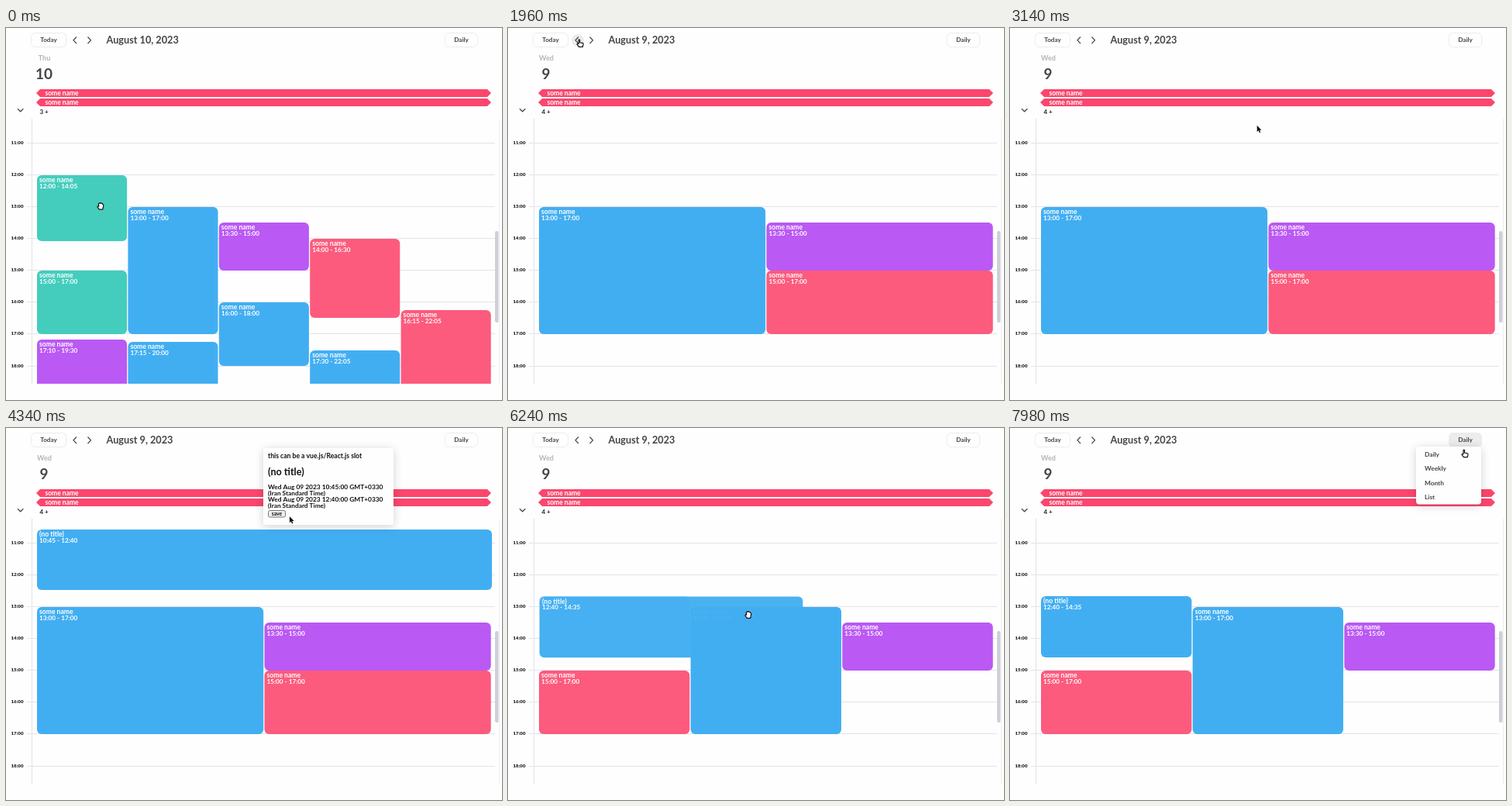
An HTML page with a canvas that plays this animation: 640 by 480 pixels, repeating every 8000 ms.

```html
<!DOCTYPE html>
<html lang="en">
<head>
<meta charset="utf-8">
<title>Day calendar</title>
<style>
html, body { margin: 0; width: 100%; height: 100%; overflow: hidden; background: #fff; }
canvas { display: block; width: 640px; height: 480px; }
</style>
</head>
<body>
<canvas id="stage" width="640" height="480"></canvas>
<script>
const ctx = document.getElementById('stage').getContext('2d');
const LOOP = 8000, LEFT = 40, GRID_WIDTH = 587, HOUR = 41.08;
const BG = '#fefefe', INK = '#45454a', LINE = '#e3e3ea', BORDER = '#ececec', HOVER = '#ececec';
const GREEN = '#44cdbd', BLUE = '#42aef2', PURPLE = '#ba59f3', RED = '#fc5b7d', ALL_DAY = '#fc466d';

// Moments of the story, in ms
const HOVER_PREV = 1420, PREV_DAY = 1960, CREATE = 3340, RELEASE = 3840,
      SAVE = 4600, GRAB = 5180, DROP = 6120, SETTLED = 6340, OPEN_MENU = 7500;

// Events: column, start, end (hours), colour, optional title
const THURSDAY = [
  [0, 12, 14 + 5 / 60, GREEN], [0, 15, 17, GREEN], [0, 17 + 10 / 60, 19.5, PURPLE],
  [1, 13, 17, BLUE], [1, 17.25, 20, BLUE], [2, 13.5, 15, PURPLE], [2, 16, 18, BLUE],
  [3, 14, 16.5, RED], [3, 17.5, 22 + 5 / 60, BLUE], [4, 16.25, 22 + 5 / 60, RED]
];
const WEDNESDAY = [[0, 13, 17, BLUE], [1, 13.5, 15, PURPLE], [1, 15, 17, RED]];
const REARRANGED = [[0, 15, 17, RED], [1, 13, 17, BLUE], [2, 13.5, 15, PURPLE]];
const START = 10.75, LENGTH = 115 / 60, DROPPED = 12 + 40 / 60;

// Cursor: time, x, y, shape from that time on
const CURSOR = [
  [0, 122, 230, 'grab'], [380, 114, 188, 'arrow'], [1320, 80.5, 16, 'arrow'],
  [HOVER_PREV, 88, 19, 'point'], [2160, 95, 20, 'point'], [2300, 96, 21, 'point'],
  [2420, 110, 30, 'arrow'], [3180, 330, 131, 'arrow'], [CREATE, 330, 131, 'arrow'],
  [RELEASE, 330, 209, 'arrow'], [4340, 366, 114, 'arrow'], [4460, 352, 112, 'point'],
  [4660, 350, 113, 'arrow'], [4860, 328, 138, 'grab'], [5100, 306, 162, 'grab'],
  [GRAB, 306, 162, 'arrow'], [5420, 314, 181, 'arrow'], [DROP, 310, 241, 'grab'],
  [6480, 310, 241, 'grab'], [6620, 334, 222, 'arrow'], [7320, 576, 24, 'point'],
  [OPEN_MENU, 587, 20, 'point'], [7960, 587, 33, 'point'], [LOOP, 587, 33, 'point']
];

const yOf = hour => 148.5 + (hour - 11) * HOUR;
const clamp = v => Math.max(0, Math.min(1, v));
const mix = (a, b, k) => a + (b - a) * k;
const smooth = k => k * k * (3 - 2 * k);

function clock(hour) {
  const minutes = Math.round(hour * 60);
  return Math.floor(minutes / 60) + ':' + String(minutes % 60).padStart(2, '0');
}

function text(str, x, y, size, color = INK, align = 'left', weight = 700) {
  ctx.font = `${weight} ${size}px Lato, sans-serif`;
  ctx.textAlign = align;
  ctx.fillStyle = color;
  ctx.fillText(str, x, y);
}

function box(x, y, w, h, r, fill, stroke) {
  ctx.beginPath();
  ctx.roundRect(x, y, w, h, r);
  if (fill) { ctx.fillStyle = fill; ctx.fill(); }
  if (stroke) { ctx.strokeStyle = stroke; ctx.lineWidth = 1; ctx.stroke(); }
}

function path(points, color, width = 1.2) {
  ctx.beginPath();
  for (const [x, y] of points) ctx.lineTo(x, y);
  ctx.strokeStyle = color;
  ctx.lineWidth = width;
  ctx.stroke();
}

function panel(x, y, w, h, r) {
  ctx.save();
  ctx.shadowColor = 'rgba(0,0,0,.18)';
  ctx.shadowBlur = 12;
  ctx.shadowOffsetY = 2;
  box(x, y, w, h, r, BG);
  ctx.restore();
}

function card(x, y, w, h, color, title, time, alpha = 1) {
  ctx.save();
  ctx.globalAlpha = alpha;
  box(x, y, w, h, Math.min(6, h / 2), color);
  ctx.clip();
  text(title, x + 3, y + 9, 8.6, '#fff');
  text(time, x + 3, y + 16.9, 8.2, '#fff');
  ctx.restore();
}

function event([column, start, end, color, title = 'some name'], columns, alpha) {
  const step = GRID_WIDTH / columns;
  const top = Math.round(yOf(start)), bottom = Math.round(yOf(end));
  card(LEFT + column * step, top, step - 1.3, bottom - top, color, title,
    `${clock(start)} - ${clock(end)}`, alpha);
}

function header(t) {
  const thursday = t < PREV_DAY;
  const todayHover = t > 1180 && t < HOVER_PREV;
  box(32.5, 6.5, 45, 18, 5, todayHover ? '#f4f4f4' : null, BORDER);
  text('Today', 55, 18, 8.1, INK, 'center');
  if (t > HOVER_PREV && t < 2400) box(82, 8, 16, 16, 8, HOVER);
  path([[91, 11.5], [87, 15.8], [91, 20]], INK);
  path([[105.5, 11.5], [109.5, 15.8], [105.5, 20]], INK);
  text(`August ${thursday ? 10 : 9}, 2023`, 129.5, 19.6, 12.7);
  box(566.5, 6.5, 42, 18, 5, t > 7260 ? HOVER : null, BORDER);
  text('Daily', 587.5, 18, 8.2, INK, 'center');

  text(thursday ? 'Thu' : 'Wed', 49.5, 42, 9, '#b4b4b8', 'center');
  text(thursday ? '10' : '9', 49, 65.8, 19, INK, 'center');
  for (const y of [79, 91]) {
    ctx.beginPath();
    for (const [x, dy] of [[39, 5], [44, 0], [621, 0], [626, 5], [621, 10], [44, 10]]) ctx.lineTo(x, y + dy);
    ctx.fillStyle = ALL_DAY;
    ctx.fill();
    text('some name', 50.5, y + 7.8, 8.5, '#fff');
  }
  text(thursday ? '3 +' : '4 +', 43.5, 111, 8, '#222');
  path([[15, 104.3], [18.7, 107.8], [22.4, 104.3]], INK);
}

function grid() {
  for (let hour = 11; hour <= 18; hour++) {
    const y = Math.floor(yOf(hour)) + .5;
    path([[27, y], [631, y]], LINE, 1);
    text(hour + ':00', 22.5, y + 1.8, 6.2, '#222', 'right', 900);
  }
  path([[33.5, 117], [33.5, 459]], LINE, 1);
  path([[636.5, 117], [636.5, 459]], '#efeff2', 1);
  box(631, 262, 4.5, 118, 2, '#cfcfd6');
}

function drag(t, cursor) {
  const dy = cursor.y - 162;
  const start = START + Math.floor(dy / HOUR * 12 + .05) / 12;
  event([0, START, START + LENGTH, BLUE, '(no title)'], 1, .38);
  const row = Math.floor((cursor.y - 148.5) / HOUR * 2) / 2 + 11;
  box(34, yOf(row), 597, HOUR / 2, 0, null, BLUE);
  card(LEFT + cursor.x - 306, yOf(START) + dy, GRID_WIDTH + 6, LENGTH * HOUR, BLUE, '(no title)',
    `${clock(start)} - ${clock(start + LENGTH)}`, .96);
}

// The dropped event shrinks from full width into its new column
function settle(t) {
  const y = yOf(DROPPED), h = LENGTH * HOUR;
  const width = mix(586, 194.5, smooth(clamp((t - DROP) / (SETTLED - DROP - 14))));
  event([0, DROPPED, DROPPED + LENGTH, BLUE, '(no title)'], 3, .4);
  card(41, y + .6, width, h, BLUE, '(no title)', '12:40 - 14:35', .95);
}

function events(t, cursor) {
  ctx.save();
  ctx.beginPath();
  ctx.rect(0, 117, 640, 342);
  ctx.clip();
  if (t < PREV_DAY) THURSDAY.forEach(e => event(e, 5));
  else if (t < DROP) WEDNESDAY.forEach(e => event(e, 2));
  else REARRANGED.forEach(e => event(e, 3));

  if (t >= CREATE && t < SAVE) {
    const height = t < RELEASE ? Math.max(4, cursor.y - 131) : 78;
    const end = START + Math.round(height / HOUR * 12) / 12;
    card(LEFT, 131, GRID_WIDTH, height, BLUE, '(no title)', `10:45 - ${clock(end)}`);
  } else if (t >= SAVE && t < GRAB) {
    event([0, START, START + LENGTH, BLUE, '(no title)'], 1);
  } else if (t >= GRAB && t < DROP) {
    drag(t, cursor);
  } else if (t >= DROP && t < SETTLED) {
    settle(t);
  } else if (t >= SETTLED) {
    event([0, DROPPED, DROPPED + LENGTH, BLUE, '(no title)'], 3);
  }
  ctx.restore();
}

function popup() {
  panel(332, 26, 168, 99, 3);
  const black = '#111';
  text('this can be a vue.js/React.js slot', 338, 39.3, 8.6, black);
  text('(no title)', 338, 60.5, 12.6, black);
  ['10:45', '12:40'].forEach((time, i) => {
    text(`Wed Aug 09 2023 ${time}:00 GMT+0330`, 338, 79.4 + i * 15.6, 8.4, black);
    text('(Iran Standard Time)', 338, 87.2 + i * 15.6, 8.3, black);
  });
  box(338.5, 106.5, 22, 8.5, 2, '#efefef', '#777');
  text('save', 349.5, 112.8, 6.8, black, 'center');
}

function menu() {
  panel(524, 24, 84, 74.5, 4);
  ['Daily', 'Weekly', 'Month', 'List'].forEach((label, i) => text(label, 535, 36.5 + i * 18.5, 8.3));
}

function cursorAt(t) {
  const i = CURSOR.findIndex(key => key[0] > t);
  const [t0, x0, y0, shape] = CURSOR[i - 1], [t1, x1, y1] = CURSOR[i];
  const k = (t - t0) / (t1 - t0);
  return { x: mix(x0, x1, k), y: mix(y0, y1, k), shape };
}

const SHAPES = {
  arrow: new Path2D('M0 0V8.2L1.9 6.5L3.2 9.4L4.6 8.8L3.3 5.9H5.8Z'),
  point: new Path2D('M-2-4.5Q-1.2-5.5-.5-4.5V-1L3.2-.3Q4.2 0 4 1.2L3.3 4.6H-1.6L-4 1.4Q-4-.2-2 .8Z'),
  grab: new Path2D('M-2.6-3Q-1.9-4.5-1-3.6Q0-5 1-3.6Q2.3-4.2 2.6-2.5Q4-2.6 3.8-.8L2.8 4.3H-1.6L-4 1Q-4-.7-2.2.2Z')
};

function drawCursor({ x, y, shape }) {
  const arrow = shape === 'arrow';
  ctx.save();
  ctx.translate(x, y);
  ctx.lineJoin = 'round';
  ctx.lineWidth = 1.2;
  ctx.strokeStyle = arrow ? '#fff' : '#111';
  ctx.fillStyle = arrow ? '#111' : '#fff';
  if (arrow) {
    ctx.stroke(SHAPES[shape]);
    ctx.fill(SHAPES[shape]);
  } else {
    ctx.fill(SHAPES[shape]);
    ctx.stroke(SHAPES[shape]);
  }
  ctx.restore();
}

function draw(t) {
  const cursor = cursorAt(t);
  ctx.fillStyle = BG;
  ctx.fillRect(0, 0, 640, 480);
  header(t);
  grid();
  events(t, cursor);
  if (t >= RELEASE + 40 && t < SAVE) popup();
  if (t >= OPEN_MENU) menu();
  drawCursor(cursor);
}

const began = performance.now();
function frame() {
  draw((performance.now() - began) % LOOP);
  requestAnimationFrame(frame);
}
frame();
</script>
</body>
</html>
```
